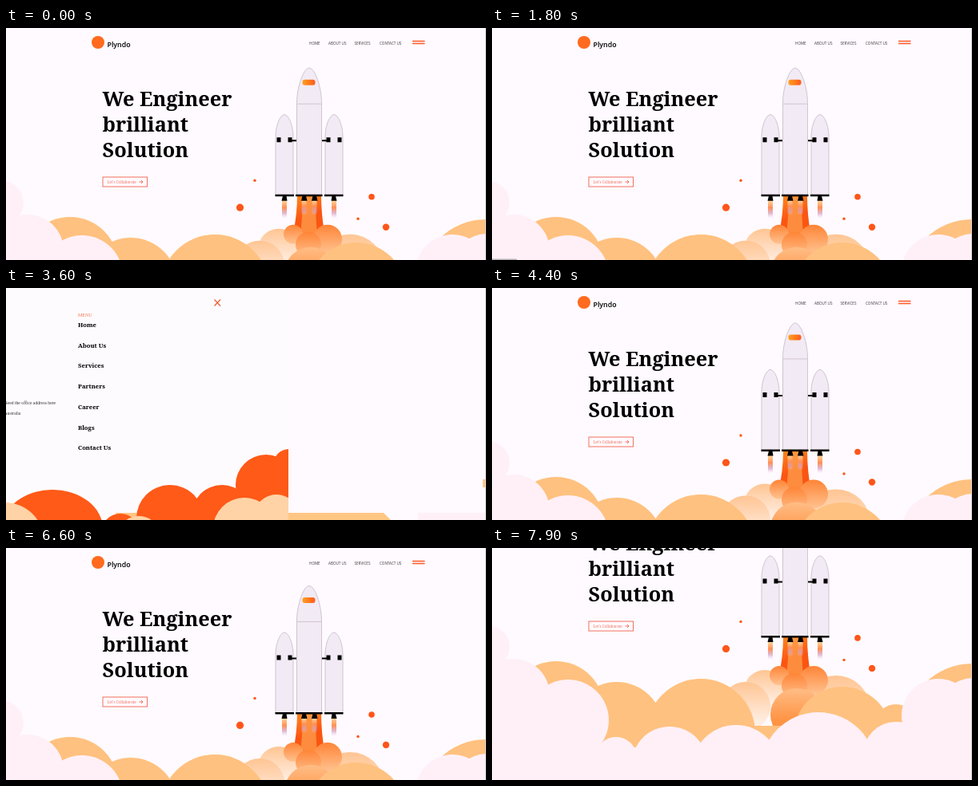
Animation, 600 px wide and 291 px high, one loop 8000 ms. Source, as an HTML page:

```html
<!DOCTYPE html>
<html lang="en">
<head>
<meta charset="utf-8">
<title>Rocket landing page</title>
<style>
  html, body { margin: 0; width: 100%; height: 100%; overflow: hidden; background: #fefaff; }
  svg { display: block; width: 100%; height: 100%; }
  .sans { font-family: "Open Sans", sans-serif; }
  .serif { font-family: "Noto Serif", serif; }
  .plain { font-family: "Liberation Serif", serif; }
  .hull { fill: #f2eaf4; stroke: #d0c4d0; stroke-width: 1; }
  .menu { font-size: 7.7px; font-weight: 600; }
</style>
</head>
<body>
<svg viewBox="0 0 600 291" preserveAspectRatio="none">
  <defs>
    <linearGradient id="glass"><stop stop-color="#ffa01f"/><stop offset="1" stop-color="#ff5a1c"/></linearGradient>
    <linearGradient id="plume" x2=".3" y2="1"><stop stop-color="#ff8a1c"/><stop offset=".6" stop-color="#fb5512"/></linearGradient>
    <linearGradient id="jet" x2="0" y2="1">
      <stop stop-color="#ffe0a8"/><stop offset=".45" stop-color="#ff8f55"/>
      <stop offset=".75" stop-color="#d79fc0" stop-opacity=".7"/><stop offset="1" stop-color="#e8c8e8" stop-opacity="0"/>
    </linearGradient>
    <linearGradient id="puff" x2="0" y2="1"><stop stop-color="#ff8436"/><stop offset="1" stop-color="#ffc290"/></linearGradient>
    <linearGradient id="mist" x2="0" y2="1"><stop stop-color="#ffc593"/><stop offset=".8" stop-color="#ffeee2"/></linearGradient>
    <linearGradient id="core" x2="0" y2="1"><stop stop-color="#ffbd86"/><stop offset=".6" stop-color="#ff9445"/></linearGradient>
    <clipPath id="panelClip"><rect width="600" height="291"/></clipPath>
  </defs>

  <g id="page">
    <g id="scene">
      <g id="rocket">
        <g id="dots" fill="#ff5519"></g>
        <path fill="url(#plume)" d="M364 210H394Q394 236 399 262H358Q364 236 364 210Z"/>
        <path fill="#ffa452" d="M372 212H386L389 262H368Z" opacity=".7"/>
        <g id="booster">
          <rect x="345" y="215" width="6" height="24" fill="url(#jet)"/>
          <path d="M346 211H350.500L351.500 217H344.500Z"/>
          <path class="hull" d="M337 210V137C337 122 343 109 348 109C353 109 359 122 359 137V210Z"/>
          <path d="M338.500 137.500h5v6h-5zM352.500 137.500h5v6h-5zM357 140.500h7v2h-7zM336.500 209h23.500v2.500h-23.500z"/>
        </g>
        <use href="#booster" transform="translate(758) scale(-1 1)"/>
        <g id="nozzle">
          <rect x="369.500" y="215" width="6" height="20" fill="url(#jet)"/>
          <path d="M370.500 211H375L376.500 217H369Z"/>
        </g>
        <use href="#nozzle" x="13"/>
        <path class="hull" d="M363.500 210V95C363.500 74 372 50.500 379 50.500C386 50.500 394.500 74 394.500 95V210Z"/>
        <path stroke="#d0c4d0" d="M363.500 95.500H394.500"/>
        <rect x="370.500" y="65" width="16" height="7" rx="3" fill="url(#glass)"/>
        <path d="M362 209h33.500v2.500h-33.500z"/>
        <g id="smoke"></g>
      </g>
      <g id="backClouds" fill="#ffc17f"></g>
      <g id="frontClouds" fill="#fff0f7"></g>
    </g>

    <g id="logo">
      <circle cx="115" cy="18" r="8" fill="#ff6a1f"/>
      <text class="sans" x="126.500" y="23.600" font-size="8.800" font-weight="600">Plyndo</text>
    </g>
    <g id="nav">
      <g class="sans" font-size="4.600" fill="#3c3038">
        <text x="379" y="20.500">HOME</text>
        <text x="403" y="20.500">ABOUT US</text>
        <text x="435.500" y="20.500">SERVICES</text>
        <text x="467" y="20.500">CONTACT US</text>
      </g>
      <path d="M508 16.500h15.500M508 19.500h15.500" stroke="#ff5a2a" stroke-width="1.300"/>
    </g>
    <g id="headline" class="serif" font-size="25.300" font-weight="600">
      <text x="120.500" y="98.300">We Engineer</text>
      <text x="120.500" y="130.300">brilliant</text>
      <text x="120.500" y="162.300">Solution</text>
    </g>
    <g id="button">
      <rect x="121" y="187" width="55.500" height="12" fill="none" stroke="#f4715c"/>
      <text class="serif" x="126.500" y="194.800" font-size="4.600" fill="#f4715c">Let's Collaborate</text>
      <path d="M166.500 193h4.500m-2-2l2 2l-2 2" fill="none" stroke="#f4604a" stroke-width=".9"/>
    </g>
  </g>

  <rect id="panelBack" width="600" height="291" fill="#fefbff"/>
  <g id="strip">
    <path fill="#ffc684" d="M137 282H472L481 291H137ZM596 240h4v10h-4z"/>
    <path fill="#fff0f7" d="M515 282h85v9h-85z"/>
  </g>
  <g id="panel" clip-path="url(#panelClip)">
    <g transform="translate(245)">
      <g id="redClouds" fill="#ff5a17"></g>
      <g id="peachClouds" fill="#ffd3a6"></g>
      <path d="M262.500 14.500l7.500 8m0-8l-7.500 8" stroke="#ee6236" stroke-width="1.300"/>
      <g class="plain">
        <text x="92" y="36" font-size="6" fill="#f0764f">MENU</text>
        <text x="-.5" y="146" font-size="5.700" fill="#333">Need the office address here</text>
        <text x="-.5" y="159" font-size="5.700" fill="#333">Australia</text>
      </g>
      <g id="links" class="serif menu"></g>
    </g>
  </g>
  <rect id="status" y="289.500" width="31" height="1.500" fill="#b9b4ba"/>
  <path d="M599.500 0V291" stroke="#cfcbd0"/>
</svg>

<script>
const LOOP = 8000;
const el = id => document.getElementById(id);
const clamp01 = v => Math.min(1, Math.max(0, v));
const ramp = (v, from, to) => clamp01((v - from) / (to - from));

function add(parent, tag, attrs, text) {
  const node = document.createElementNS("http://www.w3.org/2000/svg", tag);
  for (const key in attrs) node.setAttribute(key, attrs[key]);
  if (text) node.textContent = text;
  el(parent).appendChild(node);
}
const circles = (parent, list) => list.forEach(([cx, cy, r, fill]) =>
  add(parent, "circle", fill ? { cx, cy, r, fill: `url(#${fill})` } : { cx, cy, r }));
const block = (parent, x, y, width, height) => add(parent, "rect", { x, y, width, height });

circles("dots", [[292.500, 225.500, 4.600], [311, 191.500, 1.700], [457, 212, 3.800], [440, 239.500, 1.700], [475, 250, 4.200]]);
circles("smoke", [
  [430, 302, 43, "mist"], [341, 278, 26, "mist"], [317, 298, 31, "mist"],
  [359, 259, 12, "puff"], [402, 265, 18, "puff"], [378, 272, 16, "puff"],
  [381, 308, 33, "core"],
]);
circles("backClouds", [[80, 297, 60], [156, 321, 58], [261, 327, 68], [438, 330, 61], [505, 318, 27], [600, 322, 82]]);
block("backClouds", 60, 318, 540, 60);
circles("frontClouds", [
  [-5, 219, 27], [27, 279, 45], [95, 311, 51], [155, 358, 26], [222, 366, 47],
  [305, 372, 55], [408, 373, 72], [505, 354, 41], [558, 305, 46], [602, 304, 46],
]);
block("frontClouds", 0, 345, 600, 400);
block("frontClouds", 0, 311, 80, 60);

circles("redClouds", [[-200, 300, 50], [-110, 290, 48], [-35, 305, 45], [145, 307, 24], [207, 289, 42], [272, 285, 38], [327, 247, 38], [356, 222, 20]]);
add("redClouds", "ellipse", { cx: 60, cy: 302, rx: 63, ry: 49 });
block("redClouds", 240, 282, 115, 10);
circles("peachClouds", [[-150, 312, 45], [-60, 310, 40], [1, 317, 48], [168, 313, 27], [300, 302, 39], [340, 287, 28]]);
["Home", "About Us", "Services", "Partners", "Career", "Blogs", "Contact Us"]
  .forEach((name, i) => add("links", "text", { x: 92, y: 49 + 25.700 * i }, name));

const MENU_LENGTH = 750;
// Opening and closing play the same timeline forwards and backwards.
function menuTime(t) {
  const visit = (open, close, length) =>
    Math.max(0, Math.min(t - open, length, length - (t - close)));
  return Math.max(visit(1900, 3477.500, MENU_LENGTH), visit(4600, 5125, 525));
}

const shift = (id, x, y) => el(id).setAttribute("transform", `translate(${x.toFixed(2)} ${y.toFixed(2)})`);
const fade = (id, value) => el(id).setAttribute("opacity", value.toFixed(3));

function draw(t) {
  const menu = menuTime(t);
  const bobTime = t < 5000 ? t : t - 380;
  const bob = -6.500 - 6.500 * Math.cos((bobTime - 900) / 2000 * 2 * Math.PI);
  const scroll = 95 * ramp(t, 7300, 7900) ** 1.500;
  const panelX = 600 * (ramp(menu, 450, MENU_LENGTH) - 1);
  const leave = ramp(menu, 0, 300);
  const logoLeave = ramp(menu, 0, 375);

  shift("page", 0, -scroll);
  shift("scene", 0, 300 * ramp(menu, 250, 500));
  shift("rocket", 0, bob);
  shift("headline", -327 * leave, 0);
  fade("headline", 1 - leave);
  shift("logo", 0, -12 * logoLeave);
  fade("logo", 1 - logoLeave);
  fade("nav", 1 - ramp(menu, 0, 120));
  fade("button", 1 - ramp(menu, 0, 120));
  shift("panelBack", panelX, 0);
  shift("panel", panelX, 0);
  fade("strip", menu > 540 ? 1 : 0);
  fade("status", t >= 1750 && t < 1950 ? 1 : 0);
}

function tick(now) {
  draw(now % LOOP);
  requestAnimationFrame(tick);
}
draw(0);
requestAnimationFrame(tick);
</script>
</body>
</html>
```
